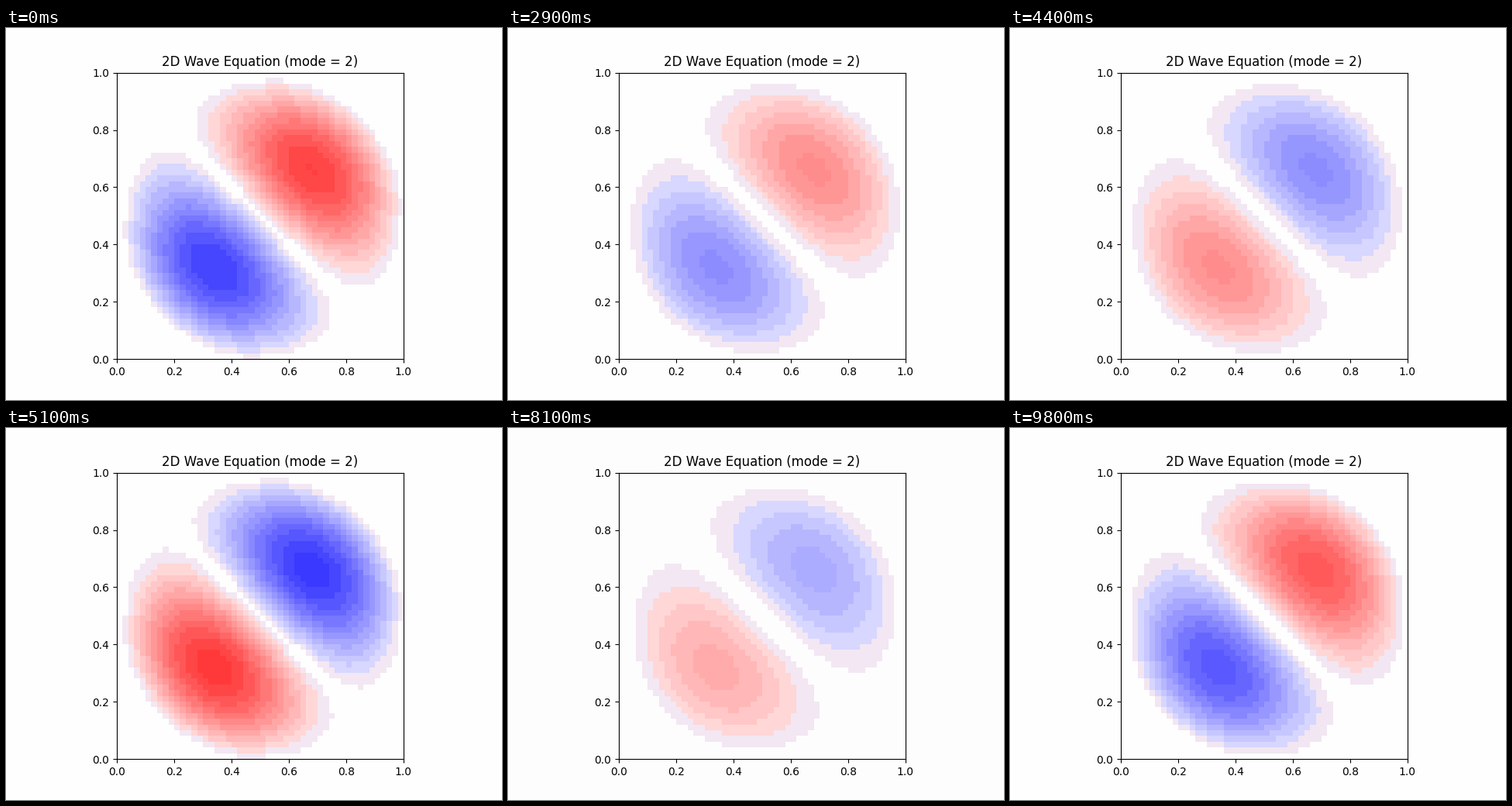
These frames come from a looping animation (640 px wide and 480 px high, 9.9 s). A matplotlib script:

```python
import numpy as np
import matplotlib.pyplot as plt
from matplotlib.animation import FuncAnimation

N = 50              # cells per side
FRAMES = 99
PERIOD = 100        # frames per oscillation
WIDTH, HEIGHT, DPI = 640, 480, 100
SIDE = 0.77 * HEIGHT


def drum_mode():
    """Diagonal one-node mode of a circular membrane, scaled to a peak of 1."""
    row, col = np.mgrid[:N, :N] - N // 2
    inside = row**2 + col**2 < (N // 2) ** 2
    count = inside.sum()
    index = np.full((N, N), -1)
    index[inside] = np.arange(count)

    laplacian = 4 * np.eye(count)
    for a, b in ((index[:-1], index[1:]), (index[:, :-1], index[:, 1:])):
        linked = (a >= 0) & (b >= 0)
        i, j = a[linked], b[linked]
        laplacian[i, j] = laplacian[j, i] = -1

    # Inverse iteration; the start vector selects the symmetry of the mode.
    inverse = np.linalg.inv(laplacian)
    vec = (col - row)[inside].astype(float)
    for _ in range(30):
        vec = inverse @ vec
        vec /= np.abs(vec).max()

    mode = np.zeros((N, N))
    mode[inside] = vec
    return mode


def shade(u):
    """Blue-white-red colours averaged in bands; returns cells and paper."""
    step = np.clip(np.floor(128 * np.abs(u)), 0, 127).astype(int)
    dim = 254 - 2 * step
    full = np.full_like(dim, 255)
    red = np.stack([full, dim, dim], axis=-1)
    blue = np.stack([dim, dim, full], axis=-1)
    rgb = np.where((u >= 0)[..., None], red, blue)

    # The two palest bands are shared by both signs.
    band = (255 - dim) // 16
    band = np.where((u < 0) & (band > 1), -band, band)

    out = np.empty((N, N, 3), np.uint8)
    paper = np.full(3, 255)
    margin = (WIDTH * HEIGHT - SIDE**2) / (SIDE / N) ** 2
    for b in np.unique(band):
        cells = band == b
        total, weight = rgb[cells].sum(axis=0), cells.sum()
        if b == 0:
            total, weight = total + 255 * margin, weight + margin
        out[cells] = (total / weight).astype(int)
        if b == 0:
            paper = (total / weight).astype(int)
    return out, paper


MODE = drum_mode()

fig, ax = plt.subplots(figsize=(WIDTH / DPI, HEIGHT / DPI), dpi=DPI)
image = ax.imshow(np.full((N, N, 3), 255, np.uint8), extent=[0, 1, 0, 1],
                  interpolation="nearest")
ax.set_title("2D Wave Equation (mode = 2)")


def update(frame):
    phase = 2 * np.pi * (frame + 1) / PERIOD
    cells, paper = shade(MODE * np.cos(phase - np.pi / 4))
    image.set_data(cells)
    fig.set_facecolor(paper / 255)
    ax.set_facecolor(paper / 255)
    return [image]


anim = FuncAnimation(fig, update, frames=FRAMES, interval=100,
                     repeat=True, repeat_delay=0, blit=False)
plt.show()
```
